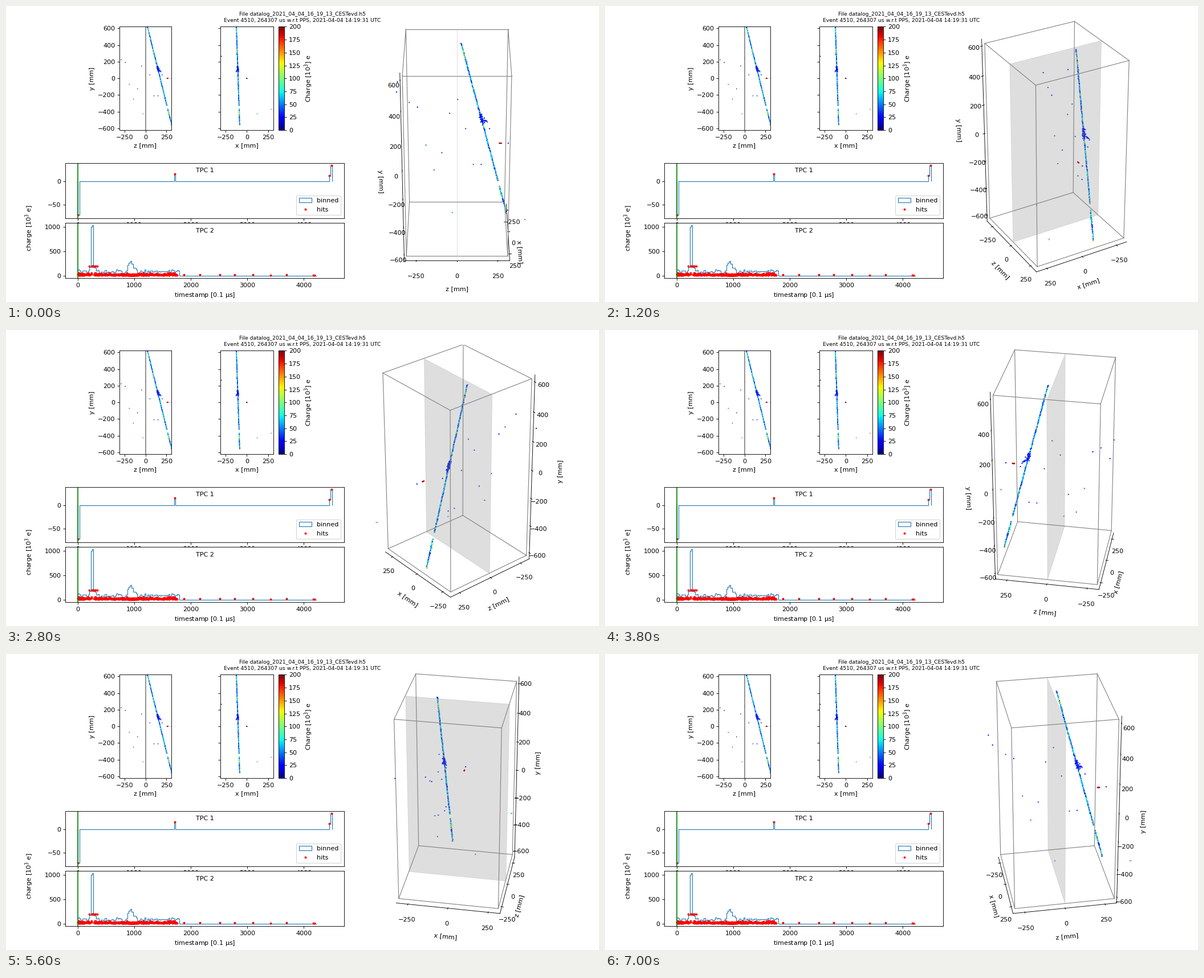
A matplotlib script that plays this animation: 1040x520 px, repeating every 7.2 s.

```python
import itertools
import math

import numpy as np
import matplotlib.pyplot as plt
from matplotlib.animation import FuncAnimation
from mpl_toolkits.mplot3d.art3d import Poly3DCollection

WIDTH, HEIGHT, DPI = 1040, 520, 80
FRAMES, INTERVAL = 36, 200
HALF_XZ, HALF_Y = 310, 620
BIN = 25
DRIFT = 0.16  # mm per 0.1 us

plt.rcParams["font.family"] = "DejaVu Sans"
rng = np.random.RandomState(4)


def place(left, top, width, height):
    """Pixel box, measured from the top left, as figure fractions."""
    return [left / WIDTH, 1 - (top + height) / HEIGHT,
            width / WIDTH, height / HEIGHT]


def near_track(y, spread, charge, shift=0):
    """Hits scattered around the straight main track at heights y."""
    x = -84 - 0.0325 * (y + 560) + rng.normal(0, spread, y.size)
    z = 27 + 0.2454 * (610 - y) + rng.normal(shift, spread, y.size)
    return np.c_[x, y, z, charge]


def make_hits():
    """Rows of x, y, z, charge: main track, delta rays and pile-up."""
    rows = np.arange(-560, 615, 4.4)
    y = np.concatenate([rows, rng.choice(rows, 90)])
    y = y[(y < -365) | (y > -325)]
    track = near_track(y, 1.2, np.clip(
        rng.lognormal(math.log(54), 0.5, y.size), 12, 140))

    knot = near_track(rng.uniform(85, 145, 45), 4.5,
                      rng.uniform(10, 40, 45), 3)
    kink = near_track(rng.uniform(-430, -400, 9), 4,
                      rng.uniform(20, 160, 9), -3)

    s = np.linspace(0, 1, 11)
    spur = np.c_[-107 - 18 * s, 98 - 14 * s + rng.normal(0, 3, 11),
                 155 + 30 * s, rng.uniform(18, 50, 11)]

    z = np.linspace(258, 271, 7)
    bright = np.c_[0 * z, 0 * z, z, 0 * z + 190]

    k = np.arange(11)
    y = 250 * np.cos(2 * np.pi * (k - 0.4) / 5.4)
    stray = np.c_[-103 - 0.03 * y, y, -290 + 49 * k, rng.uniform(22, 48, 11)]

    far = np.array([(-300, 265, -369, 24), (-120, 290, -367, 27),
                    (0, 0, 312, 20)])
    return np.vstack([track, knot, kink, spur, bright, stray, far])


tpc2_hits = make_hits()
tpc1_hits = np.array([(122, -425, -29, 58), (283, -370, 409, 62),
                      (287, -370, 414, 140)])
x, y, z, charge = np.vstack([tpc2_hits, tpc1_hits]).T
color = dict(c=charge, cmap="jet", vmin=0, vmax=200, linewidths=0)

fig = plt.figure(figsize=(WIDTH / DPI, HEIGHT / DPI), dpi=DPI)
fig.suptitle("File datalog_2021_04_04_16_19_13_CESTevd.h5\n"
             "Event 4510, 264307 us w.r.t PPS, 2021-04-04 14:19:31 UTC",
             fontsize="small")


def projection(box, horizontal, name):
    ax = fig.add_axes(place(*box))
    dots = ax.scatter(horizontal, y, s=2.4, **color)
    ax.set(xlim=(-HALF_XZ, HALF_XZ), ylim=(-HALF_Y, HALF_Y),
           xticks=[-250, 0, 250], yticks=range(-600, 601, 200),
           xlabel=f"{name} [mm]")
    return ax, dots


ax_zy, _ = projection((199, 36.4, 91, 181.6), z, "z")
ax_zy.set_ylabel("y [mm]")
ax_zy.axvline(0, color="gray")
ax_xy, dots = projection((376, 36.4, 92.7, 181.6), x, "x")
ax_xy.set_yticklabels([])
bar = fig.colorbar(dots, cax=fig.add_axes(place(478, 36.4, 10, 181.6)),
                   ticks=range(0, 201, 25))
bar.set_label("Charge [$10^3$] e")


def time_panel(box, title, bins, levels, times, charges, ylim, yticks):
    ax = fig.add_axes(place(*box))
    edges = np.arange(bins + 1) * BIN
    centers = edges[:-1] + BIN / 2
    ax.hist(centers, bins=edges, weights=levels(centers / BIN - 0.5, edges),
            histtype="step", color="tab:blue", label="binned")
    ax.plot(times, charges, "r.", markersize=5, label="hits")
    ax.axvline(0, color="g")
    ax.set(xlim=(-224.5, 4714), ylim=ylim, yticks=yticks,
           xticks=range(0, 4001, 1000))
    ax.text(0.5, 1 - 13.5 / box[3], title, transform=ax.transAxes,
            ha="center", va="center")
    return ax


def bump(k, center, width, height, power):
    return height * np.exp(-(np.abs(k - center) / width) ** power)


def tpc1_levels(k, edges):
    return np.histogram(times1, edges, weights=charges1)[0]


def tpc2_levels(k, edges):
    """Flat track signal, a square spike and a rounded peak."""
    level = (rng.uniform(45, 125, k.size) + bump(k, 9.5, 1, 880, 4)
             + bump(k, 10, 2.5, 110, 4) + bump(k, 37, 2.2, 230, 2))
    return np.where(k < 72, level, 0)


times1 = np.append(0, (tpc1_hits[:, 2] + 304) / DRIFT)
charges1 = [-73, 15, 12, 34]
ax_t1 = time_panel((104, 276, 489, 96.7), "TPC 1", 180, tpc1_levels,
                   times1, charges1, (-79.6, 38.7), [-50, 0])
ax_t1.legend(loc="lower right")

times2 = np.maximum((300 - tpc2_hits[:, 2]) / DRIFT, 0)
times2 += rng.exponential(20, times2.size)
charges2 = tpc2_hits[:, 3]
charges2 = np.where(charges2 > 180, charges2, 0.35 * charges2)
ax_t2 = time_panel((104, 381.4, 489, 97), "TPC 2", 169, tpc2_levels,
                   times2, charges2, (-57, 1078), [0, 500, 1000])
ax_t2.set_xlabel("timestamp [0.1 $\\mathrm{\\mu}$s]")
fig.text(41 / WIDTH, 1 - 390 / HEIGHT, "charge [$10^3$ e]", rotation=90,
         ha="center", va="center")

# Mpl axes x, y, z carry the detector's x, z, y.
ax3 = fig.add_axes(place(564, 26, 442, 442), projection="3d",
                   computed_zorder=False, facecolor="none")
ax3.scatter(x, z, y, s=4, depthshade=False, zorder=0, **color)

plane = [(sx * HALF_XZ, 0, sy * HALF_Y)
         for sx, sy in ((-1, -1), (1, -1), (1, 1), (-1, 1))]
gray = (0.5, 0.5, 0.5, 0.26)
ax3.add_collection3d(Poly3DCollection([plane], facecolors=[gray],
                                      edgecolors=[gray], linewidths=0.6,
                                      zorder=1))

corners = itertools.product(*[(-h, h) for h in (HALF_XZ, HALF_XZ, HALF_Y)])
for a, b in itertools.combinations(corners, 2):
    if sum(p != q for p, q in zip(a, b)) == 1:
        ax3.plot(*zip(a, b), color="gray", linewidth=1, zorder=2)

ax3.set_box_aspect((1, 1, 2))
ax3.set_xlim(-HALF_XZ, HALF_XZ, view_margin=1 / 48)
ax3.set_ylim(-HALF_XZ, HALF_XZ, view_margin=1 / 48)
ax3.set_zlim(-HALF_Y, HALF_Y, view_margin=1 / 48)
ax3.set(xlabel="x [mm]", ylabel="z [mm]",
        xticks=[-250, 0, 250], yticks=[-250, 0, 250],
        zticks=range(-600, 601, 200))
ax3.set_zlabel("y [mm]", labelpad=18)
ax3.grid(False)
for axis in (ax3.xaxis, ax3.yaxis, ax3.zaxis):
    axis.pane.set_visible(False)


def update(i):
    azim = i * 360 / FRAMES
    # A tiny nudge settles which side the axes take at right angles.
    nudge = 1e-6 * math.cos(math.radians(azim + 45))
    ax3.view_init(elev=30, azim=azim + nudge)
    return []


anim = FuncAnimation(fig, update, frames=FRAMES, interval=INTERVAL,
                     repeat=True)
plt.show()
```
